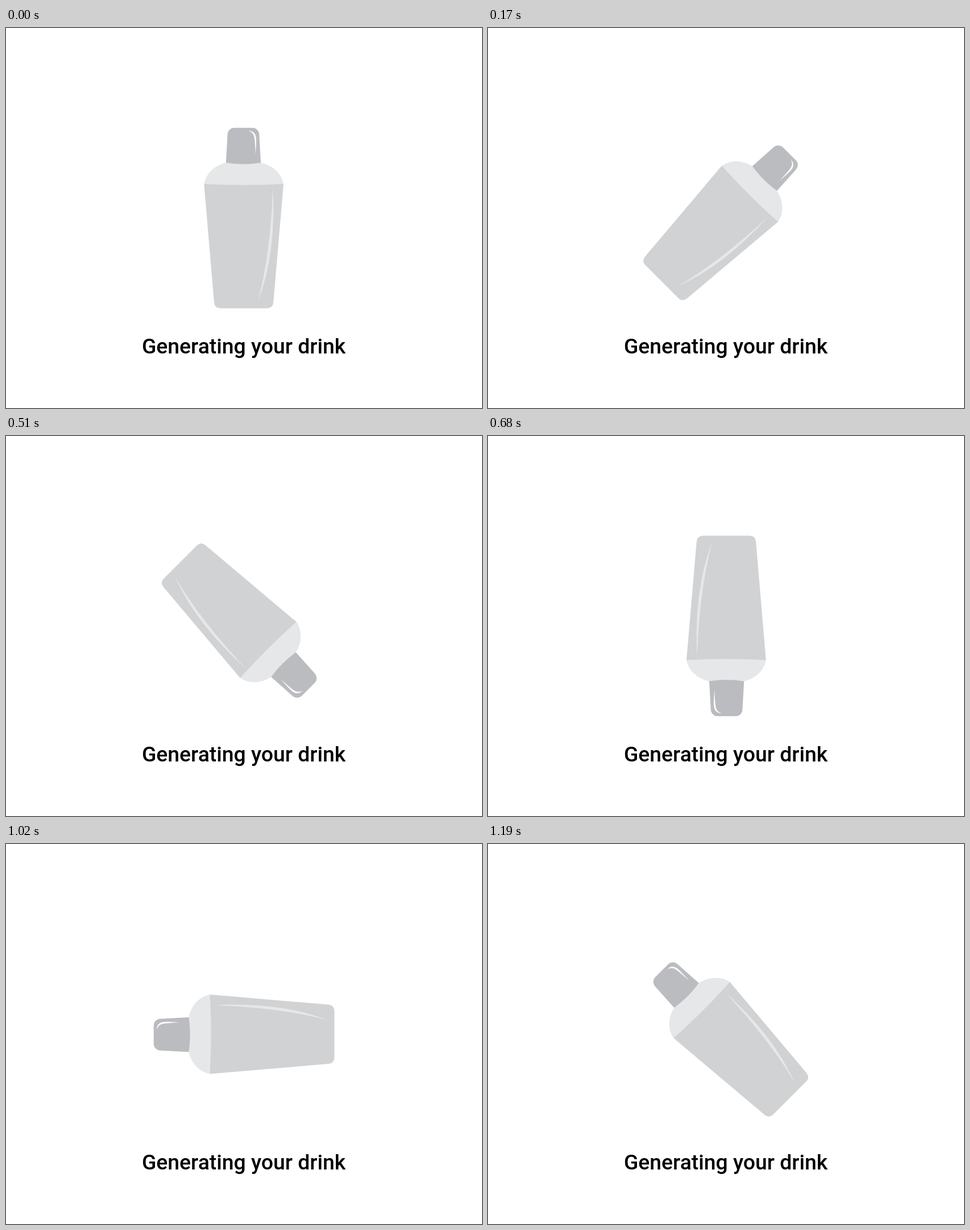
Recreate the animation shown at these times as an HTML page. Size 837 by 669 pixels, loop 1.36 s.

```html
<!DOCTYPE html>
<html lang="en">
<head>
<meta charset="utf-8">
<title>Generating your drink</title>
<style>
  html, body { margin: 0; width: 100%; height: 100%; overflow: hidden; background: #fff; }
  svg { display: block; width: 100%; height: 100%; }
  text { font: 500 37.3px Roboto, sans-serif; }
</style>
</head>
<body>
<svg viewBox="0 0 837 669">
  <g id="shaker">
    <path fill="#bbbcc0" d="M386.7 238 L389.6 187 A12 12 0 0 1 401.5 175.7 H433.3 A12 12 0 0 1 445.2 187 L448.1 238 Q418 244 386.7 238Z"/>
    <path fill="#fff" d="M426 181 C436 181 440 187 440 198 Q439.8 211 438.8 222 Q438.2 206 437 195 C436.2 187 432.5 182.8 426 181Z"/>
    <path fill="#e6e7e8" d="M386.7 237.3 Q418 242.2 448.1 237.3 C470 242 485 257 488 275 Q418 282 348.2 275 C351 257 366 242 386.7 237.3Z"/>
    <path fill="#d1d2d4" d="M348.2 274.6 Q418 278.6 488 274.6 L470.2 483 Q469 493.4 458.5 493.4 H377.5 Q367 493.4 365.9 483Z"/>
    <path fill="#e6e7e8" d="M469.3 281 Q475.4 399 443 481 Q464.7 401 469.3 281Z"/>
  </g>
  <text x="238.9" y="573">Generating your drink</text>
</svg>
<script>
  const STEP = 170, TURNS = 8;
  const shaker = document.getElementById('shaker');
  const start = performance.now();

  // The shaker jumps an eighth of a turn at each step.
  function draw(ms) {
    const step = Math.floor(ms / STEP) % TURNS;
    shaker.setAttribute('transform', `rotate(${step * 360 / TURNS} 418.5 334.5)`);
  }

  function tick(now) {
    draw(Math.max(0, now - start));
    requestAnimationFrame(tick);
  }

  draw(0);
  requestAnimationFrame(tick);
</script>
</body>
</html>
```
